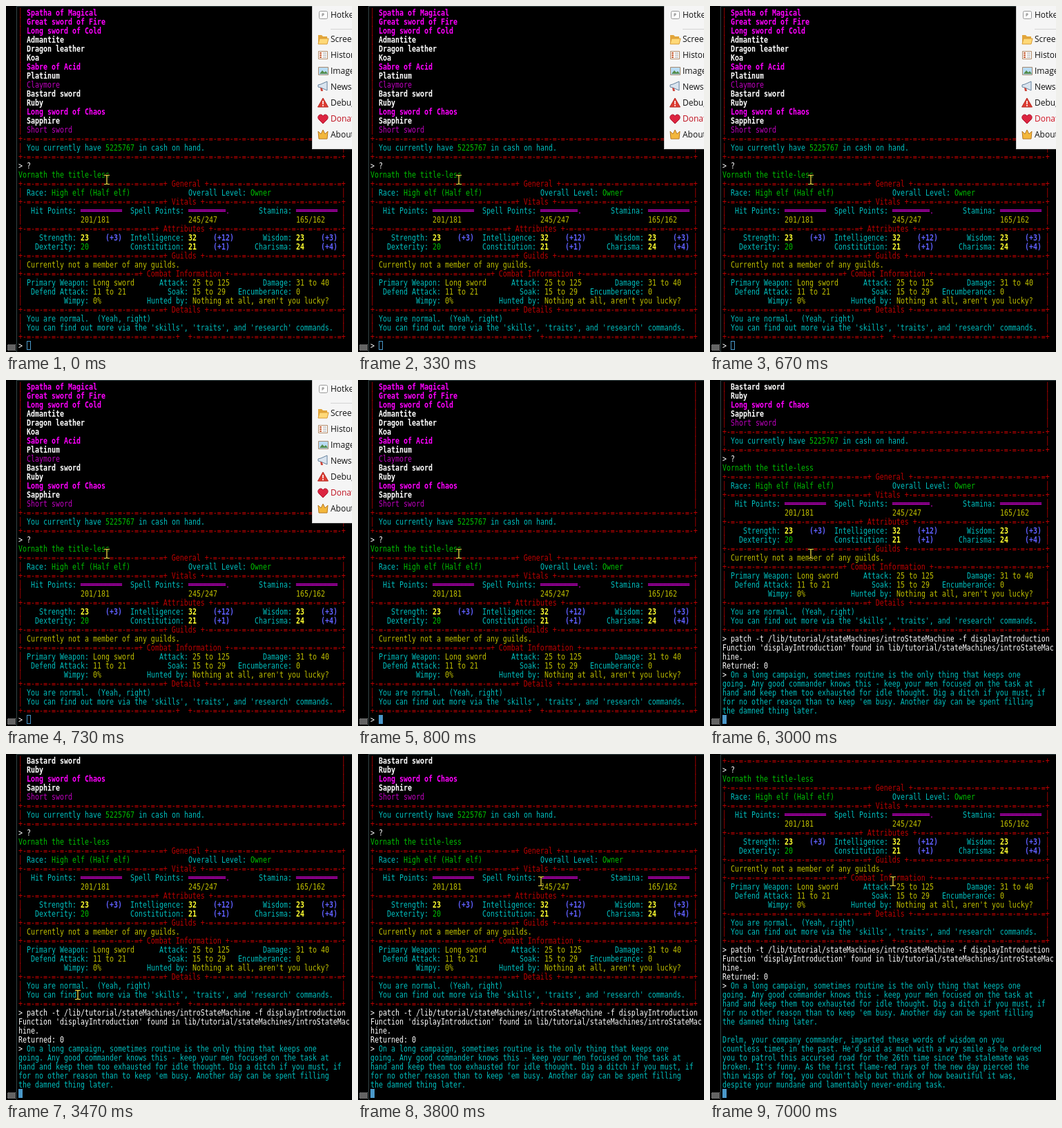
An HTML page that plays this animation: 501x500 px, repeating every 8000 ms.

```html
<!DOCTYPE html>
<html lang="en">
<head>
<meta charset="utf-8">
<title>Terminal session</title>
<style>
html, body { margin: 0; width: 100%; height: 100%; overflow: hidden; background: #000; }
svg { display: block; }
#term text { font: 9.967px "DejaVu Sans Mono", monospace; white-space: pre; }
#menu text { font: 12px "Open Sans", sans-serif; }
</style>
</head>
<body>
<svg width="501" height="500" viewBox="0 0 501 500">
  <defs>
    <pattern id="hatch" width="2" height="2" patternUnits="userSpaceOnUse">
      <path d="M0 0h1v1h-1zM1 1h1v1h-1z" fill="#c8c8c8" shape-rendering="crispEdges"/>
    </pattern>
  </defs>
  <path d="M15.5 0V500M15 .5H501" stroke="#344446"/>
  <rect x="2" y="489" width="12" height="9" fill="url(#hatch)"/>
  <g id="term">
    <g id="rows"></g>
    <text id="prompt" transform="translate(18 495) scale(1 1.2)" fill="#fff">&gt;</text>
  </g>
  <rect id="caret" y="484.5" width="5" height="12" stroke="#4a98c9"/>
  <g id="pointer" fill="none">
    <path id="beam" d="M-4-6.5h3l1 1 1-1h3M0-6v12M-4 6.5h3l1-1 1 1h3" stroke="#000" stroke-width="3"/>
    <use href="#beam" id="beamTop"/>
    <path d="M-4-6.5h3l1 1 1-1h3M0-6v12M-4 6.5h3l1-1 1 1h3" stroke="#ffe64a" stroke-width="1.2"/>
  </g>
  <g id="menu">
    <rect x="443" y="-1" width="60" height="208" fill="#f5f5f5"/>
    <path d="M443.5 0V206.500H501" fill="none" stroke="#d0d0d0"/>
    <path d="M470 33.500H501" stroke="#d4d4d4"/>
    <g id="items"></g>
    <g stroke-linejoin="round">
      <rect x="453.500" y="7.500" width="12" height="11" rx="2" fill="#fff" stroke="#999"/>
      <path d="M458 15v-4h2v2h-2" fill="none" stroke="#888"/>
      <path d="M452 42h5l2 2h6v10h-13z" fill="#e2a63c"/>
      <path d="M454 47h13l-2 8h-13z" fill="#ffd978" stroke="#d99c35"/>
      <path d="M452.500 65.500h13v11h-13z" fill="#fff" stroke="#b08a68"/>
      <path d="M454 68h3M454 71h3M454 74h3" stroke="#c8643c" stroke-width="2"/>
      <path d="M459 68h5M459 71h5M459 74h5" stroke="#999"/>
      <path d="M452.500 88.500h14v11h-14z" fill="#b9dcf5" stroke="#a58a70"/>
      <path d="M454 98l4-5 3 3 2-2 3 4z" fill="#548c4c"/>
      <path d="M452 114l4-1 9-4v13l-9-4-4-1z" fill="#d9e4ef" stroke="#66829d"/>
      <path d="M455 118l1 5h3l-1-4z" fill="#cc4438"/>
      <path d="M459 133l7.500 13h-15z" fill="#de3c32" stroke="#b52a24"/>
      <path d="M459 137v5M459 143v2" stroke="#fff" stroke-width="1.600"/>
      <path d="M459 170l-6-6c-4-5 3-10 6-5 3-5 10 0 6 5z" fill="#dc2440" stroke="#ad1830"/>
      <path d="M452 181l4 4 3-6 3 6 4-4-1 11h-12z" fill="#f3b73c" stroke="#b87820"/>
    </g>
  </g>
</svg>
<script>
const $ = id => document.getElementById(id);
const COLS = 79;
const COLORS = { r: '#bf0000', g: '#00bf00', y: '#bfbf00', m: '#bf00bf', c: '#00bfbf', w: '#ffffff',
                 Y: '#ffff30', M: '#ff00ff', B: '#6060ff', W: '#ffffff' };

// A row is a list of segments "<column><colour> <text>" joined by "|"; capital colours are bold.
const boxed = s => `0r │|${s}|78r │`;
const fill = (from, to) => Array.from({ length: to - from }, (_, i) => '=-'[(from + i) % 2]).join('');
const rule = `0r +${fill(1, COLS - 1)}+`;
function heading(title) {
  const start = 40 - (title.length >> 1), end = start + title.length + 1;
  const after = fill(1, COLS - 1 - end);
  return `0r +${fill(1, start - 2)}+ ${title} +${after}+`;
}
const items = ['M Spatha of Magical', 'M Great sword of Fire', 'M Long sword of Cold', 'W Admantite',
  'W Dragon leather', 'W Koa', 'M Sabre of Acid', 'W Platinum', 'm Claymore', 'W Bastard sword',
  'W Ruby', 'M Long sword of Chaos', 'W Sapphire', 'm Short sword'];
const bar = '═'.repeat(10);
const story = text => text.split('\n').map(line => '0c ' + line);

const lines = [
  ...items.map(s => boxed('2' + s)),
  rule,
  boxed('2c You currently have|21g 5225767|29c in cash on hand.'),
  rule,
  '0w > ?',
  '0g Vornath the title-less',
  heading('General'),
  boxed('2c Race:|8g High elf (Half elf)|41c Overall Level:|56g Owner'),
  heading('Vitals'),
  boxed(`3c Hit Points:|15M ${bar}|27c Spell Points:|41M ${bar.slice(1)}|50m .|58c Stamina:|67M ${bar}`),
  boxed('15y 201/181|41y 245/247|67y 165/162'),
  heading('Attributes'),
  boxed('5c Strength:|15Y 23|21B (+3)|27c Intelligence:|41Y 32|47B (+12)|59c Wisdom:|67Y 23|73B (+3)'),
  boxed('4c Dexterity:|15g 20|27c Constitution:|41Y 21|47B (+1)|57c Charisma:|67Y 24|73B (+4)'),
  heading('Guilds'),
  boxed('2y Currently not a member of any guilds.'),
  heading('Combat Information'),
  boxed('2c Primary Weapon:|18y Long sword|34c Attack:|42y 25 to 125|59c Damage:|67y 31 to 40'),
  boxed('3c Defend Attack:|18y 11 to 21|36c Soak:|42y 15 to 29|53c Encumberance:|67y 0'),
  boxed("11c Wimpy:|18y 0%|31c Hunted by:|42y Nothing at all, aren't you lucky?"),
  heading('Details'),
  boxed('2c You are normal.  (Yeah, right)'),
  boxed("2c You can find out more via the 'skills', 'traits', and 'research' commands."),
  heading(''),
  '0w > patch -t /lib/tutorial/stateMachines/introStateMachine -f displayIntroduction',
  "0w Function 'displayIntroduction' found in lib/tutorial/stateMachines/introStateMac",
  '0w hine.',
  '0w Returned: 0',
  '0w >|2c On a long campaign, sometimes routine is the only thing that keeps one',
  ...story(`going. Any good commander knows this - keep your men focused on the task at
hand and keep them too exhausted for idle thought. Dig a ditch if you must, if
for no other reason than to keep 'em busy. Another day can be spent filling
the damned thing later.

Drelm, your company commander, imparted these words of wisdom on you
countless times in the past. He'd said as much with a wry smile as he ordered
you to patrol this accursed road for the 26th time since the stalemate was
broken. It's funny. As the first flame-red rays of the new day pierced the
thin wisps of fog, you couldn't help but think of how beautiful it was,
despite your mundane and lamentably never-ending task.`)
];

function segment(s) {
  const [, col, color, text] = s.match(/^(\d+)(\w) (.*)$/);
  const weight = color < 'a' ? 'bold' : 'normal';
  const safe = text.replace(/>/g, '&gt;');
  return `<tspan x="${col * 6}" fill="${COLORS[color]}" font-weight="${weight}">${safe}</tspan>`;
}
$('rows').innerHTML = lines.map((line, i) =>
  `<text transform="translate(18 ${14 + 13 * i}) scale(1 1.2)">${line.split('|').map(segment).join('')}</text>`).join('');
const rows = [...$('rows').children];
$('beamTop').remove();

const labels = ['Hotkey', 'Screen', 'History', 'Image', 'News', 'Debug', 'Donate', 'About'];
$('items').innerHTML = labels.map((label, i) =>
  `<text x="470" y="${i ? 29 + 23 * i : 17}" fill="#111">${label}</text>`).join('');
const donate = $('items').children[6];

// [start ms, first visible line, caret column]
const screens = [[0, 0, 2], [2200, 4, 2], [3000, 9, 0], [7000, 16, 0]];
const path = [[146, 251], [133, 285], [104, 348], [94, 364], [118, 338], [176, 268], [236, 202], [265, 184]];

function draw(now) {
  const t = now % 8000;
  const [, top, col] = screens.findLast(s => t >= s[0]);
  $('rows').setAttribute('transform', `translate(0 ${-13 * top})`);
  rows.forEach((row, i) => row.style.display = i >= top && i < top + 37 ? '' : 'none');
  $('prompt').style.display = col ? '' : 'none';

  const menuOpen = t < 800;
  $('menu').style.display = menuOpen ? '' : 'none';
  const pulse = t % 200 >= 70 && t % 200 < 130;
  donate.setAttribute('fill', pulse ? '#d01424' : '#bf1220');
  $('caret').setAttribute('x', 18.5 + 6 * col);
  $('caret').setAttribute('fill', menuOpen ? 'none' : '#4a98c9');

  const step = t < 3400 ? 0 : Math.min(7, 1 + Math.floor((t - 3395) * 3 / 200));
  $('pointer').setAttribute('transform', `translate(${path[step]})`);
  requestAnimationFrame(draw);
}
requestAnimationFrame(draw);
</script>
</body>
</html>
```
